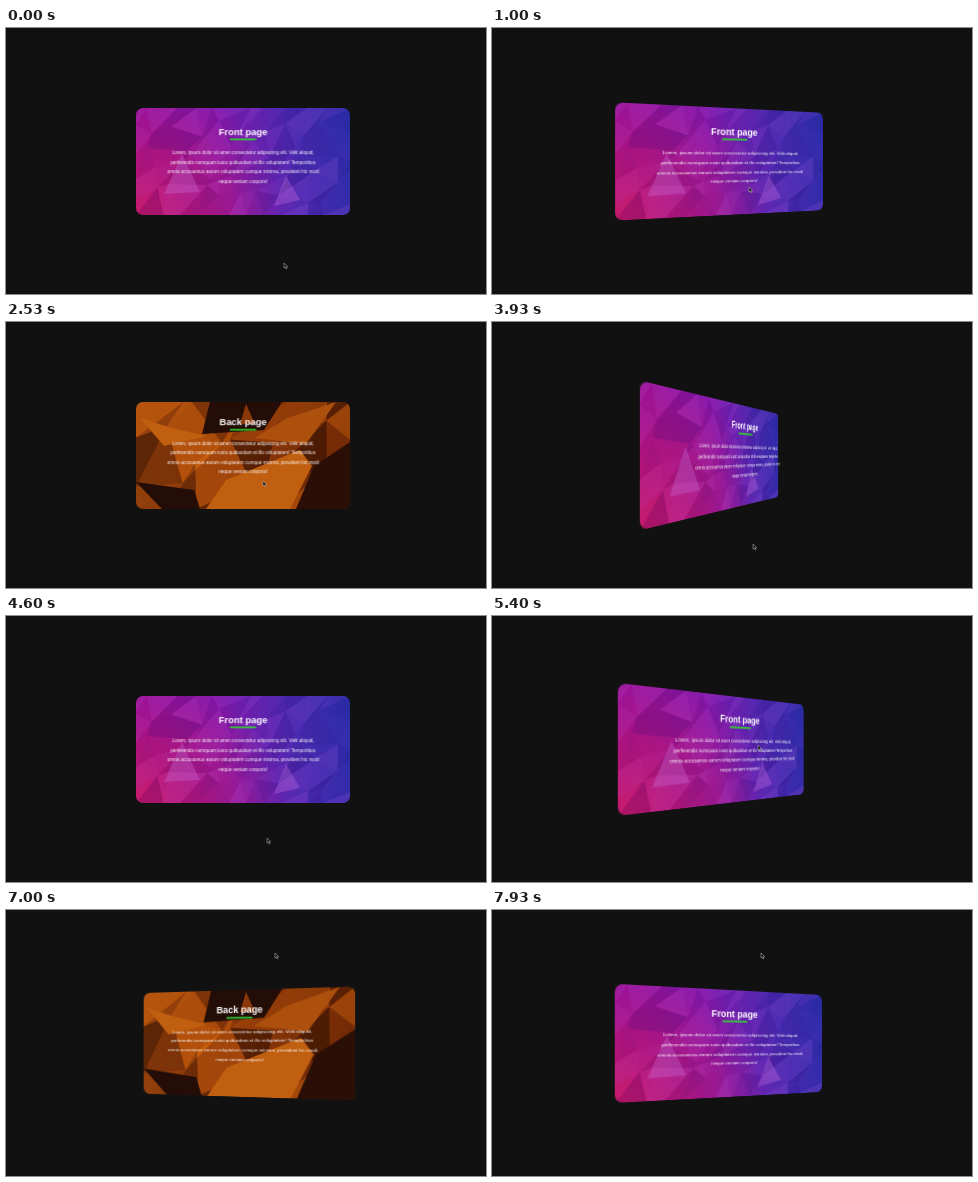
An HTML page that plays this animation: 480x266 px, repeating every 8 s.

```html
<!DOCTYPE html>
<html lang="en">
<head>
<meta charset="utf-8">
<title>Flip card</title>
<style>
  html, body { margin: 0; width: 100%; height: 100%; overflow: hidden; background: #111112; }
  .scene { position: absolute; left: 129.5px; top: 80px; width: 214px; height: 107px; perspective: 300px; }
  .card, .face, .face svg { position: absolute; inset: 0; width: 100%; height: 100%; }
  .card, .face { transform-style: preserve-3d; }
  .face svg { backface-visibility: hidden; }
  .back { transform: rotateY(180deg); }
  .art { border-radius: 7px; overflow: hidden; }
  .front .art {
    background:
      radial-gradient(circle at 0 110%, #cc1a62, #c01c7000 60%),
      linear-gradient(80deg, #900a9e, #8118ac 42%, #4a2ab0 74%, #2a2ca8);
  }
  .back .art { background: linear-gradient(100deg, #92400c, #8a3608 50%, #6e2906); }
  .face .copy { transform: translateZ(20px); overflow: visible; }
  text { fill: #fff; text-anchor: middle; font: 4.4px "Liberation Sans", Arial, sans-serif; }
  .title { font-size: 8.8px; font-weight: bold; }
  .cursor { position: absolute; left: 0; top: 0; width: 8px; height: 9px; overflow: visible; }
</style>
</head>
<body>
<div class="scene">
  <div class="card">
    <div class="face front"></div>
    <div class="face back"></div>
  </div>
</div>
<svg class="cursor"><path d="M0 0V5L1.3 3.9 2.2 6 3 5.6 2.2 3.7H3.7Z" fill="#111" stroke="#bbb" stroke-width=".5"/></svg>
<script>
const W = 214, H = 107, STEP = 1000 / 15, LOOP = 8000, FLIP = 1500;

const LINES = [
  'Lorem, ipsum dolor sit amet consectetur adipisicing elit. Velit aliquid,',
  'perferendis numquam iusto quibusdam et illo voluptatem! Temporibus',
  'omnis accusamus earum voluptatem cumque minima, provident hic modi',
  'neque veniam corporis!'
];

let seed = 11;
const random = () => (seed = seed * 16807 % 2147483647) / 2147483647;
const polygon = (points, fill) => `<polygon points="${points}" fill="${fill}"/>`;

// Jittered triangle mesh; each facet is lightened or darkened at random
function mesh(cols, rows, light, dark, strength) {
  const jitter = (i, count) => (i + (i % count ? random() - .5 : 0)) / count;
  const grid = Array.from({ length: rows + 1 }, (_, r) =>
    Array.from({ length: cols + 1 }, (_, c) => [jitter(c, cols) * W, jitter(r, rows) * H]));
  const shade = () => {
    const v = random() * 2 - 1;
    return `rgba(${v > 0 ? light : dark},${Math.abs(v) * strength})`;
  };
  let art = '';
  for (let r = 0; r < rows; r++) for (let c = 0; c < cols; c++) {
    const a = grid[r][c], b = grid[r][c + 1], d = grid[r + 1][c], e = grid[r + 1][c + 1];
    art += polygon([a, b, d], shade()) + polygon([b, e, d], shade());
  }
  return art;
}

const glow = 'rgba(205,120,225,.3)', black = '#230d06', orange = '#c05f10';

const crystalArt = mesh(10, 5, '190,95,230', '30,0,100', .17)
  + polygon('46,46 28,86 64,84', glow)
  + polygon('150,68 138,98 164,92', glow);

const facetArt = mesh(6, 3, '225,110,15', '25,6,0', .45)
  + polygon('4,16 36,26 70,34 28,44', orange)
  + polygon('74,0 146,0 128,28 66,32', black)
  + polygon('110,2 104,22 119,22', '#8a380a')
  + polygon('118,36 152,16 200,0 170,42', '#ad500d')
  + polygon('90,78 164,48 176,64 154,107 70,107', orange)
  + polygon('0,80 58,88 64,107 26,107', black)
  + polygon('214,40 178,64 160,107 214,107', '#2b0f07');

function buildFace(selector, art, title, shift) {
  const lines = LINES.map((line, i) => `<text y="${-6.4 + i * 8.75}">${line}</text>`).join('');
  document.querySelector(selector).innerHTML = `
    <svg class="art" viewBox="0 0 ${W} ${H}">${art}</svg>
    <svg class="copy" viewBox="${-W / 2} ${-H / 2} ${W} ${H}"><g transform="translate(0 ${shift})">
      <text class="title" y="-24.9">${title}</text>
      <rect x="-12.2" y="-21.4" width="24.4" height="1.6" fill="#32cd32"/>
      ${lines}
    </g></svg>`;
}

buildFace('.front', crystalArt, 'Front page', 0);
buildFace('.back', facetArt, 'Back page', -3.4);

// cubic-bezier(.42, 0, .58, 1)
function easeInOut(p) {
  if (p <= 0) return 0;
  if (p >= 1) return 1;
  let lo = 0, hi = 1, s;
  for (let i = 0; i < 24; i++) {
    s = (lo + hi) / 2;
    const x = 1.26 * s * (1 - s) ** 2 + 1.74 * s * s * (1 - s) + s ** 3;
    if (x < p) lo = s; else hi = s;
  }
  return s * s * (3 - 2 * s);
}

// The card turns over when the pointer enters and back when it leaves
const flip = (t, start) => easeInOut((t - start) / FLIP);
const angleAt = t => 180 * (flip(t, 691) - flip(t, 3000) + flip(t, 4953) - flip(t, 6752));

const MOVES = [
  { from: 70, to: 930, x: 257, y: 159 },
  { from: 2640, to: 3300, x: 261, y: 222 },
  { from: 4700, to: 5330, x: 266, y: 129 },
  { from: 6500, to: 6950, x: 269, y: 43 }
];

function pointerAt(t) {
  let x = 278, y = 235;
  for (const move of MOVES) {
    const k = Math.min(1, Math.max(0, (t - move.from) / (move.to - move.from)));
    x += (move.x - x) * k;
    y += (move.y - y) * k;
  }
  return [x, y];
}

const card = document.querySelector('.card');
const cursor = document.querySelector('.cursor');
const origin = performance.now();

function draw() {
  const elapsed = Math.max(0, performance.now() - origin) % LOOP;
  const t = Math.floor((elapsed + 4) / STEP) * STEP % LOOP;
  const [x, y] = pointerAt(t);
  card.style.transform = `rotateY(${angleAt(t)}deg)`;
  cursor.style.transform = `translate(${x}px, ${y}px)`;
  requestAnimationFrame(draw);
}
draw();
</script>
</body>
</html>
```
